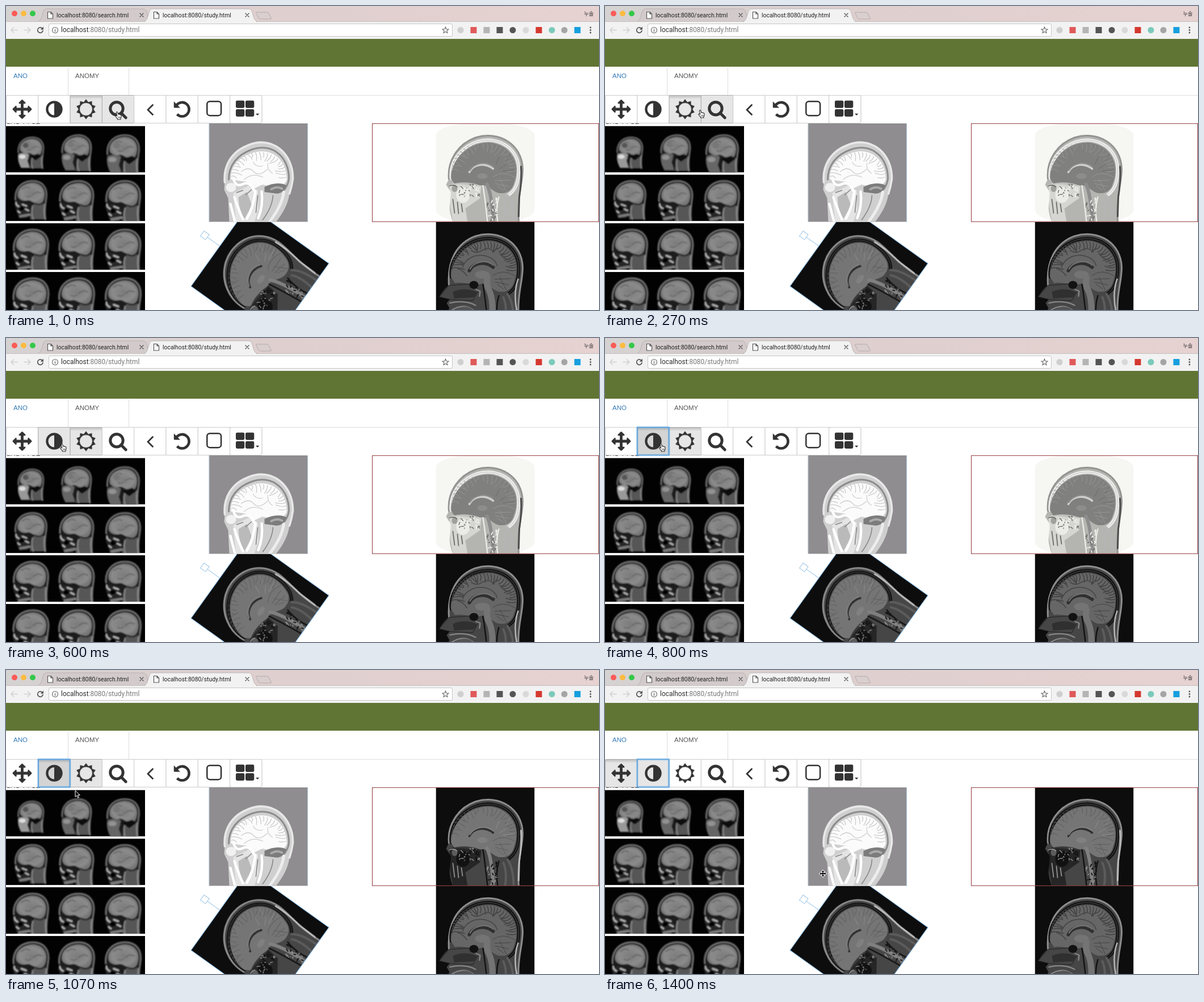
These frames come from a looping animation (1045 by 536 pixels, 1.47 s). An HTML page:

```html
<!DOCTYPE html>
<html lang="en">
<head>
<meta charset="utf-8">
<title>Study viewer</title>
<style>
html, body { margin: 0; width: 100%; height: 100%; overflow: hidden; background: #fff; }
svg { display: block; }
#stage { position: absolute; left: 0; top: 0; width: 1045px; height: 536px; }
.ui { font-family: Roboto, "Noto Sans", sans-serif; }
.page { font-family: "Liberation Sans", Arial, sans-serif; font-size: 11.5px; }
.ko { font-family: "Noto Sans CJK KR", "Noto Sans CJK", sans-serif; font-size: 9.3px; }
</style>
</head>
<body>
<svg id="stage" viewBox="0 0 1045 536"></svg>
<script>
const stage = document.getElementById('stage');
const LOOP = 1470, STEP = 200 / 3;

function random(seed) {
  return () => (seed = (seed * 16807) % 2147483647) / 2147483647;
}

const path = (d, fill, extra = '') => `<path d="${d}" fill="${fill}" ${extra}/>`;
const line = (d, color, width, extra = '') =>
  `<path d="${d}" fill="none" stroke="${color}" stroke-width="${width}" stroke-linecap="round" stroke-linejoin="round" ${extra}/>`;
const rect = (x, y, w, h, fill, extra = '') =>
  `<rect x="${x}" y="${y}" width="${w}" height="${h}" fill="${fill}" ${extra}/>`;
const oval = (x, y, rx, ry, fill, extra = '') =>
  `<ellipse cx="${x}" cy="${y}" rx="${rx}" ry="${ry}" fill="${fill}" ${extra}/>`;
const frame = (x, y, w, h, body) =>
  `<svg x="${x}" y="${y}" width="${w}" height="${h}">${body}</svg>`;

// Closed star outline with its first point at the top.
function star(cx, cy, points, outer, inner) {
  let d = '';
  for (let i = 0; i < points * 2; i++) {
    const a = i * Math.PI / points, r = i % 2 ? inner : outer;
    d += `${i ? 'L' : 'M'}${(cx + r * Math.sin(a)).toFixed(2)} ${(cy - r * Math.cos(a)).toFixed(2)}`;
  }
  return d + 'Z';
}

const defs = `<defs>
  <linearGradient id="bar"><stop offset="0" stop-color="#d5d2d2"/><stop offset=".45" stop-color="#dfcfcf"/><stop offset="1" stop-color="#e6d2d1"/></linearGradient>
  <linearGradient id="inset" x2="0" y2="1"><stop offset="0" stop-opacity=".17"/><stop offset="1" stop-opacity="0"/></linearGradient>
  <radialGradient id="tissue"><stop offset="0" stop-color="#7c7c7c"/><stop offset=".75" stop-color="#8b8b8b"/><stop offset="1" stop-color="#777"/></radialGradient>
  <filter id="soft" x="-20%" y="-20%" width="140%" height="140%"><feGaussianBlur stdDeviation="1.3"/></filter>
  <filter id="fine"><feGaussianBlur stdDeviation=".6"/></filter>
  <filter id="glow" x="-20%" y="-20%" width="140%" height="140%"><feGaussianBlur stdDeviation="1.2"/></filter>
</defs>`;

// ---- browser window ----
function tab(x, w, fill, title) {
  const r = x + w;
  return path(`M${x} 27.5C${x + 5} 26 ${x + 6} 22 ${x + 8} 15C${x + 10} 8 ${x + 11} 5 ${x + 16} 5H${r - 16}C${r - 11} 5 ${r - 10} 8 ${r - 8} 15C${r - 6} 22 ${r - 5} 26 ${r} 27.5Z`,
      fill, 'stroke="#b3a9a9" stroke-width=".8"') +
    path(`M${x + 17.5} 10.5h5.5l3.5 3.5v8h-9zM${x + 23} 10.5v3.5h3.5`, '#fff', 'stroke="#555" stroke-width="1.2"') +
    `<text x="${x + 33}" y="19.6" font-size="10.4" fill="#222">${title}</text>` +
    line(`M${r - 21} 13l6 6m0-6l-6 6`, '#555', 1.3);
}

function chrome() {
  const lights = ['#fc5b57', '#fdbc40', '#34c84a']
    .map((c, i) => oval(15 + 16 * i, 13.2, 5, 5, c)).join('');
  const marks = [
    [801, '#cfcfcf', 0], [824, '#e05a5a', 1], [847, '#b4b4b4', 1], [870, '#555', 1], [893, '#555', 0],
    [916, '#d9d9d9', 0], [939, '#d5382f', 1], [962, '#7ccabb', 0], [984, '#a5a5a5', 0], [1007, '#169fdf', 1]
  ].map(([x, c, sq]) => sq ? rect(x - 5.5, 37, 11, 11, c) : oval(x, 42.5, 5.5, 5.5, c)).join('');
  return `<g class="ui">` + rect(0, 0, 1045, 28, 'url(#bar)') + lights +
    tab(56, 201, '#d3cbcb', 'localhost:8080/search.html') +
    rect(0, 27, 1045, 31, '#f2f2f2') + line('M0 27.4H1045', '#b9afaf', .8) +
    tab(243, 200, '#f2f2f2', 'localhost:8080/study.html') + rect(245, 27, 196, 2, '#f2f2f2') +
    path('M441 11h19q2 0 3 2l4 8q1 2-1 2h-18q-2 0-3-2l-4-8q-1-2 0-2z', '#d9cfcf', 'stroke="#b1a6a6" stroke-width=".9"') +
    line('M20 42.5H9m4.5-4.5L9 42.5l4.5 4.5M32 42.5h11m-4.5-4.5l4.5 4.5-4.5 4.5', '#d0d0d0', 1.5) +
    line('M64.3 40A4.7 4.7 0 1 0 65 43.5', '#555', 1.7) + path('M66 36.5v5.2h-5.2z', '#555') +
    rect(75.5, 31.5, 711, 22, '#fff', 'rx="2.5" stroke="#c6c6c6"') +
    oval(86.5, 42.5, 5, 5, 'none', 'stroke="#666" stroke-width="1.1"') + line('M86.5 42v3M86.5 39.8v.1', '#666', 1.3) +
    `<text x="97" y="46.4" font-size="11.9" fill="#2d2d2d">localhost<tspan fill="#777">:8080/study.html</tspan></text>` +
    path(star(774.5, 42.8, 5, 5.8, 2.5), 'none', 'stroke="#666" stroke-width="1.1"') + marks +
    [38, 42.5, 47].map(y => oval(1030, y, 1.4, 1.4, '#555')).join('') +
    `<text class="ko" x="1018.5" y="17" fill="#333">누솔</text></g>`;
}

function header() {
  return rect(0, 58, 1045, 49, '#607533') +
    line('M109.5 107V157M216.5 107V157M0 157.5H1045', '#ddd', 1) +
    `<g class="page"><text x="13" y="127.3" fill="#337ab7">ANO</text><text x="122" y="127.3" fill="#555">ANOMY</text>
    <text x="0.5" y="208" fill="#333">SAG T FSE</text></g>`;
}

// ---- scans ----
function thumb(row, col) {
  const k = row * 3 + col;
  const w = Math.min(66, [47, 54, 59, 58, 62, 63][k] || 62 + row);
  const top = row ? 10 : col ? 15 : 19;
  let s = path('M-30 42C-33 12-14 0 4 0C24 0 33 14 32 30C31 44 27 52 30 76H2L-14 58Z', '#1c1c1c') +
    line('M-30 38C-32 12-14 1 4 1C23 1 32 14 31 30C30 44 26 54 29 76', '#777', 2.6) +
    path('M6 46L25 44 28 76H-2Z', '#565656') +
    path('M-25 32C-28 14-10 5 4 5C19 5 28 16 27 29C26 41 22 47 12 45C4 44 0 38-6 39Q-20 42-25 32Z', 'url(#tissue)') +
    line('M-16 17q9-7 14-2M4 28q8-8 16-3M-9 31q6 3 10-1', '#666', 2) +
    line('M8 45q10 5 17-2', '#222', 2.4) + line('M4 50q-4 13 1 26M27 47q-2 13 1 29', '#868686', 2.6);
  if (row) {
    s += path('M-32 46q14-6 26 1l4 10-4 17h-17l-4-12z', '#262626') +
      line('M-29 43q1 6 6 8M-16 47l8 3m-2 6l6 3M-25 60l4 3', '#b9b9b9', 2.8) +
      oval(-18, 55, 4.5, 4, '#050505') + line('M-20 70l18-3', '#7a7a7a', 5);
  } else {
    s += path('M-30 42Q-15 36-4 42L-6 52 -8 58-2 75H-23Q-33 57-30 42Z', col ? '#666' : '#999') +
      path('M-2 47l20-6 8 6-14 10z', '#080808') + oval(-20, 48, 8, 5, col ? '#929292' : '#ddd') +
      oval(-12, 21, 7, 6, col ? '#777' : '#555');
  }
  return `<g transform="translate(${[43.5, 124, 206][col]} ${top}) scale(${w / 64})" filter="url(#soft)">${s}</g>`;
}

function thumbs() {
  return [0, 1, 2, 3].map(row => frame(0, 211.5 + 85.8 * row, 245, 82,
    rect(0, 0, 245, 82, '#020202') + [0, 1, 2].map(c => thumb(row, c)).join(''))).join('');
}

const plain = { bg: '#0d0d0d', scalp: '#8e8e8e', skull: '#121212', rim: '#5c5c5c', flesh: '#464646', brain: '#757575',
  fold: '#5c5c5c', core: '#303030', stem: '#808080', cavity: '#121212', spot: '#929292', vein: '#bdbdbd' };
const negative = { bg: '#f6f6f2', scalp: '#939391', skull: '#efefed', rim: '#b5b5b5', flesh: '#b4b4b1', brain: '#80807f',
  fold: '#979797', core: '#cfcfcf', stem: '#8d8d8d', cavity: '#ebebe7', spot: '#6c6c6a', vein: '#484848' };
const nasal = { ...plain, brain: '#666', fold: '#444', stem: '#747474' };

function folds(color, count, seed, cx, cy, rx, ry, width) {
  const rnd = random(seed);
  let d = '';
  for (let i = 0; i < count; i++) {
    const a = Math.PI * (.98 + 1.1 * i / count), b = a + (rnd() - .5) * .22, r = .84 - rnd() * .22;
    const at = (ang, q) => `${(cx + rx * q * Math.cos(ang)).toFixed(1)} ${(cy + ry * q * Math.sin(ang)).toFixed(1)}`;
    d += `M${at(a, 1)}Q${at(a + .07, .9)} ${at(b, r)}`;
  }
  return line(d, color, width);
}

function specks(p, seed, count, x, y, w, h) {
  const rnd = random(seed);
  let d = ['', ''];
  for (let i = 0; i < count; i++)
    d[i % 2] += `M${(x + w * rnd()).toFixed(1)} ${(y + h * rnd()).toFixed(1)}q${(rnd() * 5 - 1).toFixed(1)} ${(rnd() * 4 - 2).toFixed(1)} ${(rnd() * 6 - 2).toFixed(1)} ${(rnd() * 5).toFixed(1)}`;
  return line(d[0], p.spot, 1.4) + line(d[1], p.cavity, 2);
}

// Sagittal section in a 174 x 174 box; `mid` selects the slice with the nose in view.
function head(p, mid) {
  const face = mid
    ? 'M27 174C34 166 18 159 24 152L19 143 25 136 6 132Q13 120 23 111'
    : 'M30 174C25 160 23 150 25 140L27 122 18 108 23 98';
  const dome = 'C20 68 37 37 70 25C113 12 152 38 153 80C153 108 143 124 146 174';
  const skull = 'M27 97C24 72 40 43 73 32C113 21 146 46 146 81C146 103 141 118 127 127';
  let s = p === negative
    ? rect(0, 0, 174, 174, '#fff') + rect(0, 0, 174, 174, p.bg, 'rx="62" ry="22"')
    : rect(0, 0, 174, 174, p.bg);
  s += '<g filter="url(#fine)">' + path(face + dome + 'Z', p.flesh) +
    line((mid ? 'M23 111' : 'M23 98') + dome, p.scalp, 3) +
    line(skull, p.skull, 5.5) + line(skull, p.rim, .8) +
    path('M27 98C25 76 42 46 75 36C113 26 143 52 142 83C142 108 128 125 112 123C102 122 94 109 82 109C66 113 45 104 34 108Z', p.brain) +
    folds(p.fold, mid ? 30 : 22, mid ? 91 : 47, 85, 79, 56, 44, mid ? 1.7 : 1);
  if (mid) s += line('M47 80C52 64 70 56 88 60Q104 64 108 77M62 50q9 7 20 0t21 3M113 55q6 12 18 11M38 82q10 3 17 13', p.fold, 1.5);
  s += line('M59 86C66 72 86 68 101 80', p.core, mid ? 6 : 3.6) +
    line('M60 83C67 71 87 65 101 76', p.stem, 2) +
    oval(82, 93, mid ? 13 : 9, mid ? 7 : 5, p.stem) +
    path('M97 94Q118 82 139 94Q139 119 120 123Q104 121 94 104Z', p.brain) +
    line('M101 94Q119 82 139 95M104 101l28-1M105 106l23 5M108 110l11 8M113 98l11 22', p.fold, 1) +
    line(mid ? 'M91 99Q88 111 94 121Q102 138 99 174' : 'M90 107Q99 126 101 174', p.stem, mid ? 11 : 6) +
    line('M83 110q4 24 8 64M111 130q-6 20-2 44', p.cavity, 2.4) +
    line('M126 127Q137 142 137 174M119 133q7 16 3 41', p.rim, 4);
  if (mid) {
    s += path('M23 112L6 132 26 137 65 139 75 121 66 109Z', p.flesh, 'stroke="#222" stroke-width="1"') +
      path('M30 123q23-9 43 1l-6 9-35 2z', '#303030') + oval(67, 111, 8, 7, p.cavity) +
      line('M25 143q26-6 45 4M26 157q25-17 44 2M71 119l7 3-1 9', '#868686', 2.3) +
      path('M36 154q22-12 36 8v12H38z', '#545454') + line('M145 101Q134 131 147 174', '#b4b4b4', 2.6);
  } else {
    s += path('M24 108q29-9 56 2l-2 22-26 18 4 24H30L25 146Z', p.cavity, 'opacity=".6"') +
      oval(48, 126, 12, 14, p.cavity) + oval(33, 115, 5, 6, p.spot, 'opacity=".5"') +
      line('M30 134l3 24M38 139l2 20M45 142l2 14M24 110q9-3 13 2', p.spot, 1.8) +
      specks(p, 83, 34, 42, 106, 34, 22) + specks(p, 17, 24, 91, 130, 17, 40) +
      line('M150 76Q152 98 147 130L146 164', p.vein, 2.8) +
      line('M112 80l12-7M118 84l20-2M106 72l7-15M124 67l7-11', p.vein, .6, 'opacity=".6"');
  }
  return s + '</g>';
}

function brightHead() {
  const dome = 'M28 104C25 75 40 50 68 39C110 20 149 52 148 98Q146 112 142 124';
  return rect(0, 0, 174.5, 174, '#8f8d8f') + '<g filter="url(#fine)">' +
    path(dome + 'Q139 148 118 174H36L34 132 27 117Z', '#cfcfcf') + line(dome, '#e8e8e8', 3.6) +
    line('M35 99C35 74 50 55 76 46C114 33 142 62 141 98Q139 111 131 119', '#8c8c8c', 3) +
    path('M39 99C37 75 54 58 80 51C116 42 139 70 137 100Q131 114 111 111L94 108 79 115 67 103Z', '#fbfbfb') +
    folds('#cacaca', 23, 61, 88, 91, 48, 40, 1.3) +
    line('M57 85q13-10 22 0t24-4M62 99q15-13 33-4M78 68q5 10 17 7M104 70q-2 12 8 18', '#cecece', 1.2) +
    path('M98 112Q120 101 137 109Q130 127 114 123L98 121Z', '#7c7c7c') + line('M110 116q10-6 19-1', '#aaa', 4) +
    oval(39, 113, 9, 8, '#f1f1f1') +
    path('M43 123L70 110 86 118 87 152 80 174H48Z', '#e4e4e4') +
    path('M52 130l15-9 9 23-13 24q-10-13-11-38z', '#bababa') +
    line('M44 100q4 13 16 7t21 13M45 130q4 14 15 39M82 120q-4 29-15 48M93 120q3 25-6 47M38 142l8 31', '#fff', 4.4) +
    line('M49 122l11-4M75 117l-10 9M86 127l-3 30M113 127q-1 20-18 43', '#858585', 1.6) +
    line('M132 121q-3 23-24 51', '#ededed', 5) + '</g>' +
    line('M.5 0V174M174 0V174', '#a6c3da', 1);
}

function viewer() {
  const blue = 'stroke="#78afdf" stroke-width="1"';
  return thumbs() + frame(357.5, 207, 174.5, 173.5, brightHead()) +
    frame(757.5, 207, 174, 173.5, `<g id="neg">${head(negative)}</g><g id="pos">${head(plain)}</g>`) +
    rect(645.5, 207.3, 399, 173, 'none', 'stroke="#94373a"') +
    frame(757.5, 380.7, 174, 155.3, head(nasal, true)) +
    frame(245, 381, 400, 155, `<g transform="translate(202.5 93) rotate(-54.4)">` +
      `<svg x="-87" y="-87" width="174" height="174">${head(plain)}</svg>` +
      rect(-87, -87, 174, 174, 'none', blue) +
      '<g opacity=".75">' + path('M0-87V-114', 'none', blue) + rect(-5.5, -125, 11, 11, 'none', blue) + '</g></g>');
}

// ---- toolbar ----
const edge = i => .5 + 56.3 * i;
const ink = '#333';

function icons() {
  const arm = [0, 90, 180, 270].map(a =>
    path('M-2.4 0V-9.8H-5Q-6.8-10.4-5.8-11.8L-1-16.6Q0-17.5 1-16.6L5.8-11.8Q6.8-10.4 5-9.8H2.4V0Z', ink, `transform="translate(28.5 182) rotate(${a})"`)).join('');
  const tiles = [[405, 166.7], [422, 166.7], [405, 182], [422, 182]].map(([x, y]) => rect(x, y, 15.3, 13, ink, 'rx="2.4"')).join('');
  return arm + oval(85, 182, 12.6, 12.6, 'none', `stroke="${ink}" stroke-width="4.2"`) + path('M85 170A12 12 0 0 1 85 194Z', ink) +
    path(star(141, 182, 10, 17.4, 13) + 'M129.8 182a11.2 11.2 0 1 0 22.4 0a11.2 11.2 0 1 0-22.4 0Z', ink,
      `fill-rule="evenodd" stroke="${ink}" stroke-width=".4" stroke-linejoin="round"`) +
    oval(195, 180.7, 11.2, 11.2, 'none', `stroke="${ink}" stroke-width="5"`) + line('M203.5 189.2l7.7 7.7', ink, 5) +
    line('M258.5 174.5l-8.5 8.5 8.5 8.5', ink, 2.8) +
    line('M301 174.2A12.3 12.3 0 1 1 301.5 190.8', ink, 4.6, 'style="stroke-linecap:butt"') + path('M295.8 168.2V178.5Q295.8 179.6 297 179.6H307Z', ink) +
    rect(354.3, 168.2, 24.8, 25, 'none', `rx="5" stroke="${ink}" stroke-width="2.5"`) +
    tiles + path('M440 189.8h6.4l-3.2 3.2z', ink);
}

function toolbar() {
  let s = rect(.5, 157.5, 450.4, 49, '#fff', 'rx="3" stroke="#ccc"');
  for (let i = 0; i < 8; i++)
    s += rect(edge(i), 157.5, 56.3, 49, '#fff', `id="b${i}" stroke="#ccc" ${i % 7 ? '' : 'rx="3"'}`);
  for (const i of [0, 1, 2]) s += rect(edge(i) + .5, 158, 55.3, 6, 'url(#inset)', `id="in${i}"`);
  return s + icons() + `<g id="focus">` +
    rect(56.8, 157.5, 55.8, 49, 'none', 'stroke="#66afe9" stroke-width="2.4" opacity=".6" filter="url(#glow)"') +
    rect(56.8, 157.5, 55.8, 49, 'none', 'stroke="#5ba0dc" stroke-width="1.7"') + '</g>';
}

// ---- pointers ----
function pointers() {
  const cross = 'M0-5.8L2.5-3H.9V-.9H3V-2.5L5.8 0 3 2.5V.9H.9V3H2.5L0 5.8-2.5 3H-.9V.9H-3V2.5L-5.8 0-3-2.5V-.9H-.9V-3H-2.5Z';
  return '<g id="hand">' +
    path('M-2.2 1.2L-3.7-4.8Q-3.8-6.4-2.6-6.5Q-1.5-6.5-1.2-5.2L-.3-2Q.8-3 1.6-1.7Q2.7-2.5 3.5-1.1Q5-1.5 5.1.4Q5.4 3.5 3.9 5.3V7H-1.6V5.7Q-4 3.4-5 1.5Q-5.4.2-4.2 0Q-3.2.1-2.2 1.2Z', '#fff',
      'stroke="#222" stroke-width="1.1" stroke-linejoin="round"') + line('M-.2 2.2v2.4M1.5 2.2v2.4M3.1 2.2v2.4', '#333', .7) + '</g>' +
    path('M0 0V11.2L2.7 8.8 4.5 12.9 6.5 12 4.7 8H8.3Z', '#111', 'id="arrow" stroke="#fff" stroke-width="1" stroke-linejoin="round"') +
    path(cross, '#111', 'id="cross" stroke="#fff" stroke-width="1.8" paint-order="stroke"');
}

stage.innerHTML = defs + rect(0, 0, 1045, 536, '#fff') + chrome() + header() + viewer() + toolbar() + pointers();

const $ = id => document.getElementById(id);
const show = (id, on) => $(id).setAttribute('visibility', on ? 'visible' : 'hidden');

// time, x, y
const track = [[0, 198, 193], [130, 194, 192], [200, 186, 191], [270, 170, 190], [330, 140, 191], [400, 112.5, 192], [470, 104, 193],
  [600, 101, 193], [800, 101, 193], [930, 104, 196], [1000, 110, 201.5], [1070, 122, 212.5],
  [1130, 166, 237], [1200, 238, 279], [1270, 312, 321], [1330, 362, 347], [1400, 384, 359]];

function position(t) {
  let i = 0;
  while (i < track.length - 2 && t > track[i + 1][0]) i++;
  const [a, b] = [track[i], track[i + 1]];
  const k = Math.min(1, (t - a[0]) / (b[0] - a[0]));
  return [a[1] + (b[1] - a[1]) * k, a[2] + (b[2] - a[2]) * k];
}

const levels = [['#fff', '#ccc'], ['#e6e6e6', '#adadad'], ['#d4d4d4', '#8c8c8c']];
function button(i, level, pressed) {
  $('b' + i).setAttribute('fill', levels[level][0]);
  $('b' + i).setAttribute('stroke', levels[level][1]);
  if (i < 3) show('in' + i, pressed);
}

const tick = n => Math.round(n * STEP / 10) * 10;

function draw(time) {
  const now = time % LOOP;
  let n = 0;
  while (n < 21 && tick(n + 1) <= now) n++;
  const t = tick(n), down = t >= 800, done = t >= 1130;

  button(0, done ? 1 : 0, done);
  button(1, t < 470 ? 0 : down && !done ? 2 : 1, down && !done);
  button(2, done ? 0 : t >= 330 && t < 470 ? 2 : 1, t < 1070);
  button(3, t < 330 ? 1 : 0);
  show('focus', down);
  show('neg', t < 1070);
  show('pos', t >= 1070);

  const [x, y] = position(t);
  const kind = t < 1070 ? 'hand' : x > 358 ? 'cross' : 'arrow';
  for (const id of ['hand', 'arrow', 'cross']) show(id, id === kind);
  $(kind).setAttribute('transform', `translate(${x} ${y})`);
}

const start = performance.now();
function loop() {
  draw(performance.now() - start);
  requestAnimationFrame(loop);
}
loop();
</script>
</body>
</html>
```
